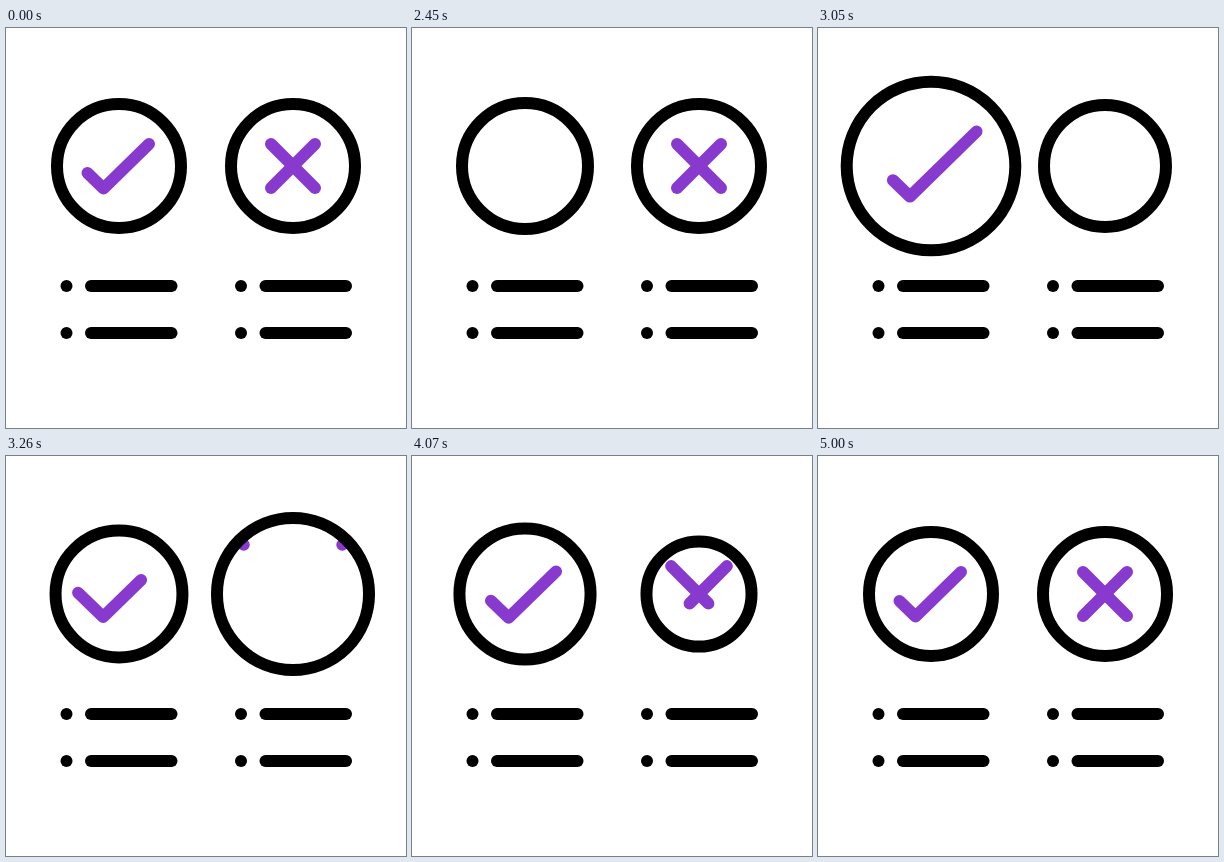
Write an HTML page with a canvas that moves like this. It is 400 by 400 pixels and loops after 5.03 s.

```html
<!DOCTYPE html>
<html lang="en">
<head>
<meta charset="utf-8">
<title>Check and cross</title>
<style>
html, body { margin: 0; height: 100%; overflow: hidden; background: #fff; }
canvas { display: block; width: 400px; height: 400px; }
</style>
</head>
<body>
<canvas></canvas>
<script>
const LOOP = 5030, STEP = 30, START = 2000;
const RADIUS = 62, WIDTH = 12, LEAVE_MS = 375;
const PURPLE = '#883acf';
const canvas = document.querySelector('canvas');
const ctx = canvas.getContext('2d');
const dpr = window.devicePixelRatio || 1;
canvas.width = canvas.height = 400 * dpr;

// Turning points of the ring's bounce and of the entering strokes, in ms.
const RING_BEATS = [0, 220, 910, 1460, 1980, 2400];
const STROKE_BEATS = [0, 640, 980, 1440, 1840];

// Paths are relative to the centre; slides are offsets along the path.
const badges = [
  {
    x: 113, leave: START, enter: 2560, peak: 28, slides: [-125, 13, -3, 1, 0],
    paths: [[[30, -22], [-15.5, 22.5], [-31.5, 7]]]
  },
  {
    x: 287, leave: 2620, enter: 3120, peak: 25, slides: [-101, 14, -16, 4, 0],
    paths: [[[-22, -22], [22, 22]], [[22, -22], [-22, 22]]]
  }
];

// Swing from value to value with a cosine ease between beats.
function swing(beats, values, t) {
  if (t <= 0) return values[0];
  const i = beats.findIndex(b => b > t);
  if (i < 0) return values.at(-1);
  const p = (t - beats[i - 1]) / (beats[i] - beats[i - 1]);
  return values[i - 1] + (values[i] - values[i - 1]) * (1 - Math.cos(Math.PI * p)) / 2;
}

const distance = (a, b) => Math.hypot(b[0] - a[0], b[1] - a[1]);

function along(a, b, dist) {
  const k = dist / distance(a, b);
  return [a[0] + (b[0] - a[0]) * k, a[1] + (b[1] - a[1]) * k];
}

// Part of a path between two distances; both ends may run past it.
function trimmed([a, b, c], tail, head) {
  if (!c) return [along(a, b, tail), along(a, b, head)];
  const bend = distance(a, b);
  const at = u => u < bend ? along(a, b, u) : along(b, c, u - bend);
  return tail < bend && head > bend ? [at(tail), b, at(head)] : [at(tail), at(head)];
}

function line(points, color) {
  ctx.beginPath();
  points.forEach(p => ctx.lineTo(...p));
  ctx.lineWidth = WIDTH;
  ctx.strokeStyle = color;
  ctx.stroke();
}

function circle(x, y, r) {
  ctx.beginPath();
  ctx.arc(x, y, r, 0, Math.PI * 2);
}

function drawStroke(path, badge, t, scale) {
  const length = path.slice(1).reduce((sum, p, i) => sum + distance(path[i], p), 0);
  let tail = 0, head = length;
  if (t < badge.enter) {
    tail = length * Math.max(0, t - badge.leave) / LEAVE_MS;
    if (tail >= length) return;
  } else {
    const slide = swing(STROKE_BEATS, badge.slides, t - badge.enter);
    tail += slide;
    head += slide;
  }
  line(trimmed(path, tail, head).map(([x, y]) => [x * scale, y * scale]), PURPLE);
}

function drawBadge(badge, t) {
  const bounce = [0, -8, badge.peak, -9.5, 4, 0];
  const r = RADIUS + swing(RING_BEATS, bounce, t - badge.leave);
  ctx.save();
  ctx.translate(badge.x, 138);
  ctx.save();
  circle(0, 0, r);
  ctx.clip();
  badge.paths.forEach(path => drawStroke(path, badge, t, r / RADIUS));
  ctx.restore();
  circle(0, 0, r);
  ctx.lineWidth = WIDTH;
  ctx.strokeStyle = '#000';
  ctx.stroke();
  ctx.restore();
}

function drawList(x) {
  for (const y of [258, 305]) {
    circle(x, y, 6);
    ctx.fillStyle = '#000';
    ctx.fill();
    line([[x + 24.5, y], [x + 105, y]], '#000');
  }
}

function frame() {
  const now = performance.now() % LOOP;
  const t = START + Math.floor((now - START) / STEP) * STEP;
  ctx.setTransform(dpr, 0, 0, dpr, 0, 0);
  ctx.fillStyle = '#fff';
  ctx.fillRect(0, 0, 400, 400);
  ctx.lineCap = ctx.lineJoin = 'round';
  drawList(60.5);
  drawList(235);
  badges.forEach(badge => drawBadge(badge, t));
  requestAnimationFrame(frame);
}
frame();
</script>
</body>
</html>
```
